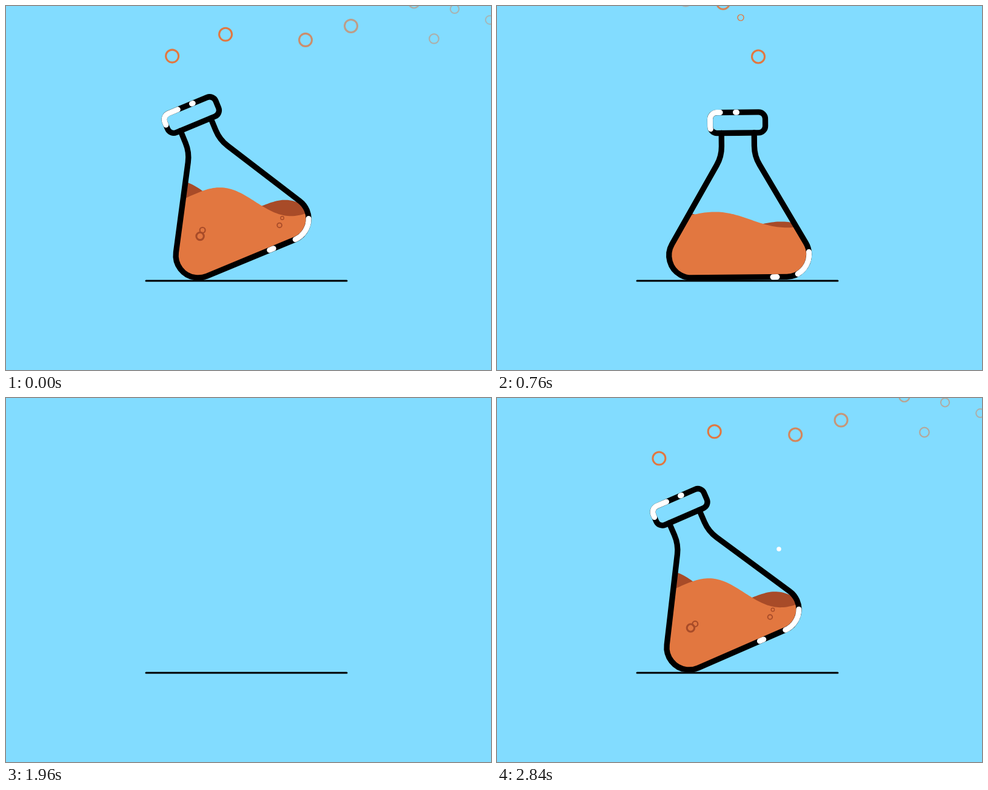
Animation, 800 px wide and 600 px high, one loop 2880 ms. Source, as an HTML page with a canvas:

```html
<!DOCTYPE html>
<html lang="en">
<head>
<meta charset="utf-8">
<title>Rocking flask</title>
<style>
  html, body { margin: 0; width: 100%; height: 100%; overflow: hidden; background: #82dcff; }
  canvas { display: block; }
</style>
</head>
<body>
<canvas id="stage" width="800" height="600"></canvas>
<script>
const ctx = document.getElementById('stage').getContext('2d');
const SKY = '#82dcff', ORANGE = '#e27740', RUST = '#a84b28', WHITE = '#fff', BLACK = '#000';

// Times run from -780 to 2100 ms, with zero at the start of the loop
const LOOP = 2880, WRAP = 2100, TURN = -43, FALL = 1106;
const HALF = 78.5, R = 37, GROUND = 411, CAP_Y = -218, AXIS = 399.3, OUTLINE = 9.3;

const { PI, sin, cos, exp, min, max, abs } = Math;
const clamp = (v, a = 0, b = 1) => min(b, max(a, v));
const span = (t, a, b) => clamp((t - a) / (b - a));
const fallen = t => .002226 * max(0, t - FALL) ** 2;

// Flask outline around the middle of its two round corners
const SIDE = .525; // slope of the side walls, in radians
const edgeX = HALF + R * cos(SIDE), edgeY = -R * sin(SIDE);

const body = new Path2D();
body.moveTo(-27, -201);
body.arcTo(-27, -162.6, -edgeX, edgeY, 62);
body.lineTo(-edgeX, edgeY);
body.arc(-HALF, 0, R, PI + SIDE, PI / 2, true);
body.lineTo(HALF, R);
body.arc(HALF, 0, R, PI / 2, -SIDE, true);
body.arcTo(27, -162.6, 27, -201, 62);
body.lineTo(27, -201);

const rim = new Path2D();
rim.moveTo(-HALF, R);
rim.lineTo(HALF, R);
rim.arc(HALF, 0, R, PI / 2, -SIDE, true);
rim.lineTo(27, -162.6);

const cap = new Path2D();
cap.moveTo(0, 17);
cap.arcTo(-45.5, 17, -45.5, -17, 11);
cap.arcTo(-45.5, -17, 45.5, -17, 11);
cap.arcTo(45.5, -17, 45.5, 17, 11);
cap.arcTo(45.5, 17, 0, 17, 11);
cap.closePath();

// Degrees: leans back while sliding in, then rocks like a damped spring
function tilt(t) {
  if (t > FALL) return 15.6 * ((t - FALL) / 374) ** 2;
  if (t < TURN) return -23.5 * sin(PI / 2 * span(t, -741, TURN));
  const s = t - TURN, w = PI * s / 483;
  return -23.5 * exp(-s / 412) * (cos(w) + .373 * sin(w)) * (1 - span(t, 900, FALL));
}

function pose(t) {
  const deg = tilt(t), a = deg * PI / 180, c = cos(a), s = sin(a), drop = fallen(t);
  const at = (x, y) => ({ x, y, a, deg, drop });
  if (t > FALL) return at(AXIS - 96 * s, GROUND - 96 + 96 * c + drop);
  if (deg > 0) return at(AXIS + HALF + .3 * deg - HALF * c, GROUND - HALF * s);
  const slide = 580 * (1 - span(t, -720, -180)) ** 2;
  return at(AXIS - HALF + .165 * deg + slide + HALF * c, GROUND + HALF * s);
}

function line(x1, y1, x2, y2, width, color) {
  ctx.lineWidth = width;
  ctx.strokeStyle = color;
  ctx.beginPath();
  ctx.moveTo(x1, y1);
  ctx.lineTo(x2, y2);
  ctx.stroke();
}

function disc(x, y, r) {
  ctx.beginPath();
  ctx.arc(x, y, r, 0, 2 * PI);
}

function ring(x, y, r, width, color) {
  ctx.strokeStyle = color;
  ctx.lineWidth = width;
  disc(x, y, r);
  ctx.stroke();
}

function outline(path) {
  ctx.lineWidth = OUTLINE;
  ctx.strokeStyle = BLACK;
  ctx.stroke(path);
}

function glint(path, start, len) {
  ctx.lineWidth = 9;
  ctx.strokeStyle = WHITE;
  ctx.setLineDash([len, 2000]);
  ctx.lineDashOffset = -start;
  ctx.stroke(path);
  ctx.setLineDash([]);
}

function wave(p, level, slope, height, crest, length, color) {
  ctx.fillStyle = color;
  ctx.beginPath();
  ctx.moveTo(p.x - 150, p.y + 150);
  for (let x = -150; x <= 150; x += 3) {
    ctx.lineTo(p.x + x, level + slope * x - height * cos(2 * PI * (x - crest) / length));
  }
  ctx.lineTo(p.x + 150, p.y + 150);
  ctx.fill();
}

function drawLiquid(t, p, rush) {
  const level = 352 - 1.4 * abs(p.deg) + p.drop;
  const height = 18 * exp(-max(0, t - 440) / 520);
  const crest = 5 - 38 * cos(PI * (t - TURN) / 400);
  const slope = -.00018 * height * crest;
  wave(p, level + 9 - .4 * height, 1.8 * slope, .9 * height, 80 + 40 * rush, 180, RUST);
  wave(p, level, slope, height, crest, 210, ORANGE);
}

// Two bubbles, the second smaller and set off by (dx, dy)
function drawPair(t, p, from, to, x, y, dx, dy, r, solid) {
  const grow = min(span(t, from, from + 60), 1 - span(t, to - 60, to));
  for (let i = 0; i < 2 && grow > 0; i++) {
    const px = p.x + x + i * dx, py = p.y + y + i * dy, size = r * grow * .72 ** i;
    if (solid) {
      ctx.fillStyle = ORANGE;
      disc(px, py, size);
      ctx.fill();
    } else {
      ring(px, py, size, size * .5, RUST);
    }
  }
}

function drawFizz(t, p) {
  const spread = -.0875 * min(t, 0), rise = -.02 * t;
  drawPair(t, p, -560, 190, -69.5, rise - 1.5, 4 + spread, spread - 10, 6.2);
  drawPair(t, p, -200, 120, 61.5, rise - 19.5, 4.5, -12, 3.8);
  drawPair(t, p, -430, -270, -79.5, -51, 14, 13, 7, true);
  drawPair(t, p, 340, 550, 41.5, -111, 7.5, -14, 2.2, true);
}

function drawFlask(t) {
  const p = pose(t);
  if (p.y > 900) return;
  const rush = span(-t, 40, 360);
  const place = () => { ctx.translate(p.x, p.y); ctx.rotate(p.a); };

  ctx.save();
  place();
  ctx.clip(body);
  ctx.setTransform(1, 0, 0, 1, 0, 0);
  drawLiquid(t, p, rush);
  drawFizz(t, p);
  ctx.restore();

  // The glints creep along the outline, faster during the slide
  ctx.save();
  place();
  outline(body);
  glint(rim, 2 * HALF + 1 + .0235 * t - 15.5 * rush, 43 - 6 * rush);
  glint(rim, 2 * HALF - 45 + .0288 * t - 82 * rush, 7);

  ctx.translate(0, CAP_Y);
  if (t < -260) drawCapShine(18 + (t + 360) * .1);
  outline(cap);
  glint(cap, 58.6 - .0145 * t + 59 * rush, 39 - 18 * rush);
  glint(cap, 122.6 - .014 * t + 13 * rush, 2);
  ctx.restore();
}

function drawCapShine(x) {
  ctx.save();
  ctx.clip(cap);
  ctx.fillStyle = WHITE;
  ctx.beginPath();
  ctx.moveTo(x - 3, -17);
  ctx.lineTo(50, -17);
  ctx.lineTo(50, 17);
  ctx.lineTo(x + 4, 17);
  ctx.fill();
  ctx.restore();
}

function drawRing(x, y, r, age, alpha) {
  if (age <= 0 || alpha <= 0) return;
  ctx.globalAlpha = min(1, alpha);
  const size = r * span(age, 0, 30);
  ring(x, y, size, size * .29, ORANGE);
  ctx.globalAlpha = 1;
}

// Where the rings left behind by the slide have drifted to at time zero
const trail = [
  [274, 83], [362, 47], [494, 56], [540, -25], [569, 33], [605, -20],
  [673, -5], [700, -20], [706, 54], [740, 5], [798, 23]
];

function drawTrail(t) {
  for (const [x, y] of trail) {
    const born = 130 + 1.15 * (x - 274);
    const left = 98 * (130 / born) ** 1.2 * (exp(-t / 250) - 1);
    const r = clamp(10.5 - (x - 570) / 50, 7, 10.5);
    drawRing(x - .4 * left, y + left, r, t + born, (420 / x) ** 1.55 - t / 500);
  }
}

// Large and small rings puff out in turn while the flask rocks
function drawPuffs(t) {
  for (let i = 0; i < 4; i++) {
    const age = t - 150 - 253 * i;
    const y = 155 * exp(-age / 260) - 20;
    drawRing(402 - 29 * cos(i * PI / 2), y, i % 2 ? 5 : 10.5, age, (1150 - age) / 600);
  }
}

function drawGround(t) {
  const gone = t < 1400 ? span(t, 880, 1100) : 1 - span(t, 1700, 1950);
  const half = 165.5 * (1 - gone ** 2);
  if (half > 0) line(396.5 - half, 453, 396.5 + half, 453, 3, BLACK);
}

function drawFallLines(t) {
  if (t < FALL || t > 1710) return;
  const streak = (x, start, lead, end, pattern = []) => {
    const top = start + (end - start) * span(t, 1280, 1710) ** 2.34;
    const bottom = min(end, lead + fallen(t));
    if (bottom <= top) return;
    ctx.setLineDash(pattern);
    ctx.lineDashOffset = 0;
    line(x, bottom, x, top, 7.5, WHITE);
    ctx.setLineDash([]);
  };
  streak(347.5, 218, 89, 520);
  streak(404, 186, 132, 555);
  streak(459, 190, 97, 530, [79, 29, 18, 22, 7, 900]);
}

function drawSlideLines(t) {
  const streak = (y, end, start, lag) => {
    const reach = from => end + (830 - end) * (1 - span(t, from, from + 320)) ** 2;
    if (t > start && t < start + lag + 390) line(reach(start), y, reach(start + lag), y, 7.5, WHITE);
  };
  streak(249, 465, -480, 60);
  streak(277.5, 510, -533, 72);
}

function draw(ms) {
  const t = ms >= WRAP ? ms - LOOP : ms;
  ctx.fillStyle = SKY;
  ctx.fillRect(0, 0, 800, 600);
  ctx.lineCap = 'round';
  drawGround(t);
  drawSlideLines(t);
  drawFallLines(t);
  drawFlask(t);
  drawTrail(t);
  drawPuffs(t);
}

const start = performance.now();
function tick() {
  draw((performance.now() - start) % LOOP);
  requestAnimationFrame(tick);
}
tick();
</script>
</body>
</html>
```
